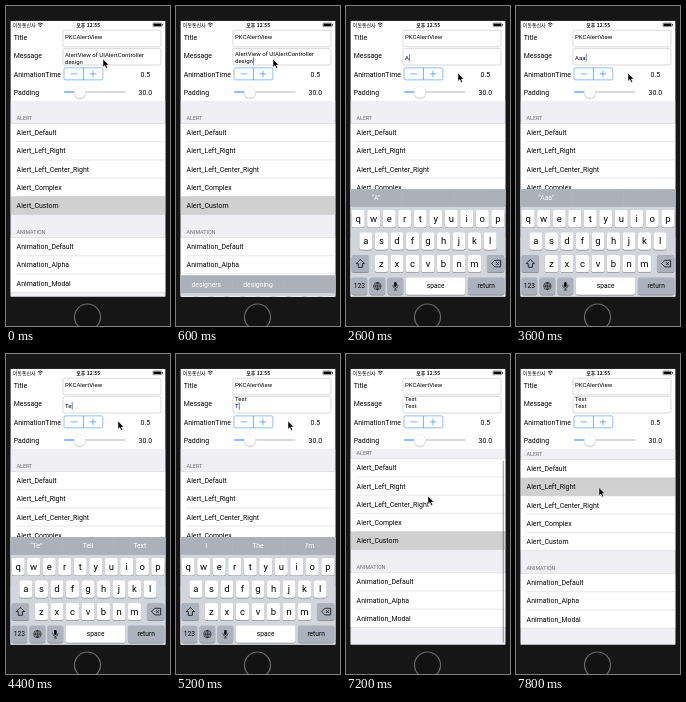
Write an HTML page that moves like this. It is 164x320 px and loops after 8 s.

```html
<!DOCTYPE html>
<html lang="ko">
<head>
<meta charset="utf-8">
<title>Alert demo</title>
<style>
html, body { margin: 0; width: 100%; height: 100%; overflow: hidden; background: #161616; }
svg { display: block; width: 100%; height: 100%; }
text { font-family: Roboto, "Liberation Sans", sans-serif; white-space: pre; }
.status { font-family: "Noto Sans CJK KR", "Noto Sans CJK", "Noto Sans", sans-serif; }
.upper .letter { text-transform: uppercase; }
.upper #shiftKey { fill: #fff; }
</style>
</head>
<body>
<svg viewBox="0 0 164 320">
  <defs>
    <clipPath id="screenClip"><rect width="375" height="667"/></clipPath>
    <clipPath id="tableClip"><rect y="193" width="375" height="474"/></clipPath>
    <clipPath id="messageClip"><rect x="127" y="66" width="238" height="41"/></clipPath>
  </defs>
  <rect width="164" height="320" fill="#161616"/>
  <circle cx="81.5" cy="311" r="13" fill="#121212" stroke="#6a6a6a" stroke-width="1.2"/>
  <!-- the screen is laid out in 375 x 667 points -->
  <g transform="translate(4.4 14.7) scale(.4138)" clip-path="url(#screenClip)">
    <rect width="375" height="667" fill="#fff"/>
    <g id="status"></g>
    <g id="form"></g>
    <g clip-path="url(#messageClip)">
      <text id="line1" x="132" font-size="14.6"></text>
      <text id="line2" x="132" font-size="14.6"></text>
      <rect id="caret" width="2" height="18" fill="#3b63f3"/>
    </g>
    <g clip-path="url(#tableClip)">
      <rect y="193" width="375" height="474" fill="#efeff4"/>
      <g id="table"></g>
      <rect id="indicator" x="368" y="222" width="3" height="440" rx="1.5" opacity=".35"/>
    </g>
    <g id="keyboard"></g>
  </g>
  <path id="cursor" d="M0 0v8.2l1.9-1.7 1.3 2.9 1.4-.6-1.3-2.8h2.5z" fill="#000" stroke="#fff" stroke-width=".5"/>
</svg>
<script>
const $ = id => document.getElementById(id);
const BLUE = '#1a7cf9', BODY = 16.8, FIELD = 14.6;

const rect = (x, y, w, h, fill, more = '') =>
  `<rect x="${x}" y="${y}" width="${w}" height="${h}" fill="${fill}" ${more}/>`;
const line = (d, color, width) =>
  `<path d="${d}" fill="none" stroke="${color}" stroke-width="${width}"/>`;
// y is the middle of the capitals
const label = (x, y, size, str, more = '') =>
  `<text x="${x}" y="${y + size * .36}" font-size="${size}" ${more}>${str}</text>`;
const MIDDLE = 'text-anchor="middle"';

function statusMarkup() {
  return label(6, 10, 12, '이동통신사', 'class="status"') +
    label(188, 10, 12, '오후 12:55', `class="status" font-weight="700" ${MIDDLE}`) +
    line('M66 8q6-5 12 0M68.5 11q3.5-3 7 0', '#000', 2) +
    '<circle cx="72" cy="13.5" r="1.5"/>' +
    rect(344.5, 5.5, 21, 9, '#fff', 'rx="1.5" stroke="#000"') +
    rect(346, 7, 18, 6, '#000') + rect(366.5, 8, 1.8, 4, '#000');
}

function formMarkup() {
  const box = y => rect(127, y, 237, 40, '#fff', 'rx="5" stroke="#c4c4c4" stroke-width="1.5"');
  return ['Title', 'Message', 'AnimationTime', 'Padding']
      .map((name, i) => label(8, 41.7 + i * 43.6, BODY, name)).join('') +
    box(23) + box(67) + label(132, 39, FIELD, 'PKCAlertView') +
    rect(129.5, 114, 94, 29, '#fff', `rx="4" stroke="${BLUE}" stroke-width="1.2"`) +
    line('M176.5 114v29M145.5 128.5h16M191.5 128.5h16M199.5 120.5v16', BLUE, 1.4) +
    label(326, 129, BODY, '0.5', MIDDLE) + label(326, 172.5, BODY, '30.0', MIDDLE) +
    line('M130 172.5h38', BLUE, 2.5) + line('M168 172.5h110', '#b7b7b7', 2.5) +
    '<circle cx="168" cy="175.5" r="15" opacity=".13"/>' +
    '<circle cx="168" cy="172.5" r="14" fill="#fff" stroke="#ddd"/>';
}

const ROW = 44, HEADER = 55.5;
const sections = [
  ['ALERT', ['Alert_Default', 'Alert_Left_Right', 'Alert_Left_Center_Right', 'Alert_Complex', 'Alert_Custom']],
  ['ANIMATION', ['Animation_Default', 'Animation_Alpha', 'Animation_Modal']]
];

function tableMarkup() {
  let y = 193, out = '';
  for (const [title, rows] of sections) {
    out += label(15, y + 42, 13, title, 'fill="#6d6d72"');
    y += HEADER;
    rows.forEach((name, i) => {
      out += rect(0, y, 375, ROW, '#fff', `id="${name}"`) + label(15, y + 22, BODY, name) +
        line(`M${i ? 15 : 0} ${y}H375`, '#c8c7cc', 1);
      y += ROW;
    });
    out += line(`M0 ${y}H375`, '#c8c7cc', 1);
  }
  return out;
}

function keyboardMarkup() {
  const rowY = i => 478.5 + i * 54.3;
  const key = (x, w, row, fill = '#fff', id = '') => {
    const y = rowY(row) - 21;
    return rect(x, y + 1.5, w, 42, '#85898f', 'rx="5"') +
      rect(x, y, w, 42, fill, `rx="5" ${id && `id="${id}"`}`);
  };
  const GREY = '#abb2bd';
  let out = rect(0, 407, 375, 260, '#d2d5db') + rect(0, 407, 375, 43, '#abb0b9') +
    line('M125 412v33M250 412v33', '#bec2ca', 1);
  [62.5, 187.5, 312.5].forEach((x, i) => {
    out += label(x, 428, 16.5, '', `id="hint${i}" fill="#fff" ${MIDDLE}`);
  });
  [['qwertyuiop', 3], ['asdfghjkl', 21.75], ['zxcvbnm', 59.25]].forEach(([letters, left], row) => {
    [...letters].forEach((c, i) => {
      const x = left + i * 37.5;
      out += key(x, 31.5, row) + label(x + 15.75, rowY(row) - 1, 23, c, `class="letter" ${MIDDLE}`);
    });
  });
  out += key(3, 42, 2, GREY, 'shiftKey') + key(330, 42, 2, GREY) +
    line('M24 577l-10 10h5v9h10v-9h5z', '#000', 1.8) +
    line('M349 579h14v16h-14l-8-8zM352 583.5l7 7m0-7l-7 7', '#000', 1.8);
  [3, 46.5, 90].forEach(x => out += key(x, 37.5, 3, GREY));
  out += key(133.5, 144.5, 3) + key(284, 88, 3, GREY);
  const y = rowY(3);
  return out + label(21.75, y, 16, '123', MIDDLE) +
    label(206, y, 16, 'space', MIDDLE) + label(328, y, 16, 'return', MIDDLE) +
    `<g transform="translate(65.25 ${y})">` +
    line('M-9 0a9 9 0 1 1 18 0a9 9 0 1 1-18 0zM-9 0h18M0-9v18M0-9q-9 9 0 18q9-9 0-18', '#000', 1.4) + '</g>' +
    `<g transform="translate(108.75 ${y})">` + rect(-3, -10, 6, 12, '#000', 'rx="3"') +
    line('M-6-3v2q0 6 6 6t6-6v-2M0 5v4M-4 9.5h8', '#000', 1.4) + '</g>';
}

$('status').innerHTML = statusMarkup();
$('form').innerHTML = formMarkup();
$('table').innerHTML = tableMarkup();
$('keyboard').innerHTML = keyboardMarkup();

// Tracks: [time, value...]
const typing = [
  [0, 'AlertView of UIAlertController\ndesign'],
  [1600, 'AlertView of UIAlertController'], [1800, 'AlertView of '], [2000, 'AlertView'], [2200, ''],
  [2600, 'A'], [2800, 'Aa'], [3000, 'Aaa'], [3800, 'Aa'], [4000, ''],
  [4200, 'T'], [4400, 'Te'], [4600, 'Test'], [4800, 'Test\n'],
  [5200, 'Test\nT'], [5400, 'Test\nTe'], [5600, 'Test\nTes'], [5800, 'Test\nTest']
];
const firstLine = [[0, 82.5], [600, 80.5], [2200, 89.5], [4800, 73]];
const hints = [
  [0, 'designers', 'designing', ''], [1600, '', '', ''], [2200, 'I', 'The', 'I’m'],
  [2600, '“A”', '', ''], [2800, '“Aa”', '', ''], [3000, '“Aaa”', '', ''], [3800, '“Aa”', '', ''],
  [4000, 'I', 'The', 'I’m'], [4400, '“Te”', 'Tell', 'Text'], [4600, '“Test”', 'Testing', 'Tests'],
  [4800, 'I', 'The', 'I’m'], [5400, '“Te”', 'Tell', 'Text'], [5800, '“Test”', 'Testing', 'Tests']
];
const pointer = [
  [0, 97, 53], [600, 97, 53], [1200, 112, 67], [6200, 112, 67], [6600, 116.5, 163.5],
  [6800, 112, 148], [7200, 82, 142], [7400, 83, 133.5]
];
const keyboardDrop = [[0, 260], [500, 260], [850, 0], [6600, 0], [6950, 260]];
const scrolling = [[0, 0], [6600, 0], [7000, 34], [7200, 31], [7400, 29]];

const current = (track, t) => track.filter(k => k[0] <= t).pop();
function ease(track, t) {
  const from = current(track, t), to = track[track.indexOf(from) + 1];
  if (!to) return from.slice(1);
  const p = (t - from[0]) / (to[0] - from[0]), e = p * p * (3 - 2 * p);
  return from.slice(1).map((v, i) => v + (to[i + 1] - v) * e);
}

function draw(t) {
  const text = current(typing, t)[1], lines = text.split('\n');
  const last = lines.length - 1, lineY = i => current(firstLine, t)[1] + i * 17;
  [$('line1'), $('line2')].forEach((el, i) => {
    el.textContent = lines[i] || '';
    el.setAttribute('y', lineY(i) + FIELD * .36);
  });
  const width = lines[last] ? $(last ? 'line2' : 'line1').getComputedTextLength() : 0;
  $('caret').setAttribute('x', 132.5 + width);
  $('caret').setAttribute('y', lineY(last) - 9);
  $('caret').setAttribute('opacity', t >= 600 && t < 6800 ? 1 : 0);

  const words = current(hints, t);
  for (let i = 0; i < 3; i++) $('hint' + i).textContent = words[i + 1];
  $('keyboard').classList.toggle('upper', text === '' || text.endsWith('\n'));
  $('keyboard').setAttribute('transform', `translate(0 ${ease(keyboardDrop, t)[0]})`);

  $('table').setAttribute('transform', `translate(0 ${-ease(scrolling, t)[0]})`);
  $('indicator').setAttribute('visibility', t >= 6800 && t < 7600 ? 'visible' : 'hidden');
  const selected = t < 7600 ? 'Alert_Custom' : 'Alert_Left_Right';
  for (const name of sections[0][1]) $(name).setAttribute('fill', name === selected ? '#d0d0d0' : '#fff');
  $('cursor').setAttribute('transform', `translate(${ease(pointer, t)})`);
}

const start = performance.now();
function tick() {
  draw(Math.floor(((performance.now() - start) % 8000) / 200) * 200);
  requestAnimationFrame(tick);
}
tick();
</script>
</body>
</html>
```
